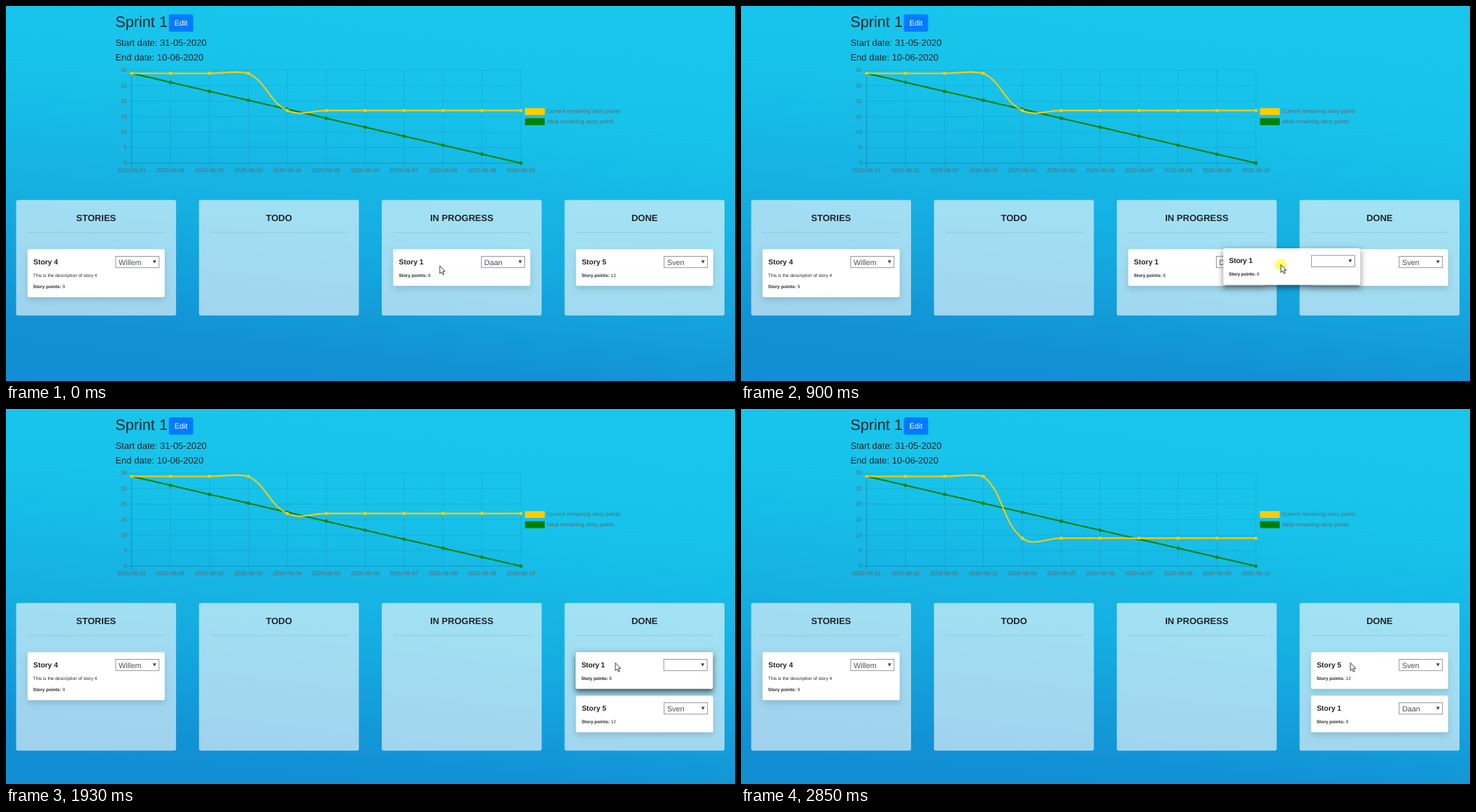
An HTML page with a canvas for the animation above (2930 ms loop, 1042 px wide and 537 px high).

```html
<!DOCTYPE html>
<html lang="en">
<head>
<meta charset="utf-8">
<title>Sprint board</title>
<style>
html, body { margin: 0; width: 100%; height: 100%; overflow: hidden; background: #15b4e4; }
canvas { display: block; width: 100vw; height: 100vh; }
</style>
</head>
<body>
<canvas id="board"></canvas>
<script>
const W = 1042, H = 537, LOOP = 2930;
const PRESS = 240, PICK = 330, ENTER = 1045, DROP = 1680, SWAP = 1950, CHART = 1960;
const FONT = '"Liberation Sans", Arial, sans-serif';
const INK = '#212529';
const COLS = ['STORIES', 'TODO', 'IN PROGRESS', 'DONE'];
const colX = i => 14.5 + i * 261.3;
const cardX = i => colX(i) + 16.3;
const CARD_W = 196, CARD_H = 52.5, ROW1 = 348.3, ROW2 = 410.5;

const story1 = { title: 'Story 1', owner: 'Daan', points: 8 };
const story4 = { title: 'Story 4', owner: 'Willem', points: 9, text: 'This is the description of story 4' };
const story5 = { title: 'Story 5', owner: 'Sven', points: 12 };

// [time, x, y]
const POINTER = [[210, 620, 372], [330, 623, 372.5], [450, 639.5, 374], [730, 715, 373],
  [900, 771.5, 370.5], [1170, 846.5, 360], [1260, 858, 360.5], [1440, 858, 360.5], [1530, 871, 363.5]];
const DRAG = [[330, 554, 348.5], [450, 568, 350], [730, 643, 349.5], [900, 689, 347],
  [1170, 775, 337], [1260, 791.5, 337], [1440, 791.5, 337], [1530, 805, 339.5]];

const canvas = document.getElementById('board');
const dpr = window.devicePixelRatio || 1;
canvas.width = W * dpr;
canvas.height = H * dpr;
const ctx = canvas.getContext('2d');
ctx.scale(dpr, dpr);
ctx.textRendering = 'geometricPrecision';

const lerp = (a, b, p) => a + (b - a) * p;
const clamp = (v, lo, hi) => Math.min(hi, Math.max(lo, v));

function follow(keys, t) {
  const i = keys.findIndex(k => k[0] > t);
  if (i === 0) return keys[0].slice(1);
  if (i < 0) return keys[keys.length - 1].slice(1);
  const a = keys[i - 1], b = keys[i], p = (t - a[0]) / (b[0] - a[0]);
  return [lerp(a[1], b[1], p), lerp(a[2], b[2], p)];
}

function text(str, x, y, size, { color = INK, weight = 400, align = 'left', spacing = 0 } = {}) {
  ctx.font = `${weight} ${size}px ${FONT}`;
  ctx.letterSpacing = spacing + 'px';
  ctx.textAlign = align;
  ctx.fillStyle = color;
  ctx.fillText(str, x, y);
  return ctx.measureText(str).width;
}

function box(x, y, w, h, r, color) {
  ctx.fillStyle = color;
  ctx.beginPath();
  ctx.roundRect(x, y, w, h, r);
  ctx.fill();
}

function line(x1, y1, x2, y2, color, width) {
  ctx.strokeStyle = color;
  ctx.lineWidth = width;
  ctx.beginPath();
  ctx.moveTo(x1, y1);
  ctx.lineTo(x2, y2);
  ctx.stroke();
}

// Casts only the shadow; the box itself stays off stage.
function shadow(x, y, w, h, dy, blur, spread, alpha) {
  const off = 3000;
  ctx.save();
  ctx.shadowColor = `rgba(0,0,0,${alpha})`;
  ctx.shadowBlur = blur * dpr;
  ctx.shadowOffsetX = off * dpr;
  ctx.shadowOffsetY = dy * dpr;
  box(x - off - spread, y - spread, w + 2 * spread, h + 2 * spread, 2, '#000');
  ctx.restore();
}

function background() {
  const g = ctx.createLinearGradient(521, 0, 521 - 62, H);
  g.addColorStop(0, '#18c5eb');
  g.addColorStop(0.24, '#17c3ea');
  g.addColorStop(0.6, '#15aee1');
  g.addColorStop(0.93, '#1291d5');
  g.addColorStop(1, '#128fd4');
  ctx.fillStyle = g;
  ctx.fillRect(0, 0, W, H);
}

function header() {
  text('Sprint 1', 156.2, 29.5, 21.7);
  box(232.7, 12, 34.8, 24.8, 2.6, '#007bff');
  text('Edit', 250.1, 27.7, 10.85, { color: '#fff', align: 'center' });
  text('Start date: 31-05-2020', 156.4, 57.4, 13.03);
  text('End date: 10-06-2020', 156.4, 78.4, 13.03);
}

const X0 = 179.5, DX = 55.65, Y_TOP = 92, Y_BASE = 225;
const dayX = i => X0 + i * DX;
const valueY = v => Y_BASE - v * (Y_BASE - Y_TOP) / 30;

// Spline with tension 0.4, handles kept inside the plot area.
function handles(pts, i) {
  const cur = pts[i], prev = pts[i - 1] || cur, next = pts[i + 1] || cur;
  const d1 = Math.hypot(cur[0] - prev[0], cur[1] - prev[1]);
  const d2 = Math.hypot(next[0] - cur[0], next[1] - cur[1]);
  const handle = d => {
    const f = 0.4 * d / (d1 + d2);
    return [clamp(cur[0] + f * (next[0] - prev[0]), X0, dayX(10)),
      clamp(cur[1] + f * (next[1] - prev[1]), Y_TOP, Y_BASE)];
  };
  return { before: handle(-d1), after: handle(d2) };
}

function series(values, color) {
  const pts = values.map((v, i) => [dayX(i), valueY(v)]);
  const ctl = pts.map((_, i) => handles(pts, i));
  ctx.strokeStyle = ctx.fillStyle = color;
  ctx.lineWidth = 2.05;
  ctx.beginPath();
  ctx.moveTo(...pts[0]);
  for (let i = 1; i < pts.length; i++)
    ctx.bezierCurveTo(...ctl[i - 1].after, ...ctl[i].before, ...pts[i]);
  ctx.stroke();
  for (const [x, y] of pts) {
    ctx.beginPath();
    ctx.arc(x, y, 2.4, 0, 7);
    ctx.fill();
  }
}

function chart(t) {
  const grey = '#666';
  const days = [...Array(11).keys()];
  for (const i of days) {
    const x = dayX(i);
    line(x, Y_TOP, x, Y_BASE + 6, `rgba(0,0,0,${i ? 0.1 : 0.25})`, 0.8);
    const label = i ? '2020-06-' + String(i).padStart(2, '0') : '2020-05-31';
    text(label, x, 238.4, 8, { color: grey, align: 'center' });
  }
  for (let v = 0; v <= 30; v += 5) {
    const y = valueY(v);
    line(X0 - 6, y, dayX(10), y, `rgba(0,0,0,${v ? 0.1 : 0.25})`, 0.8);
    text(v, 173, y + 2.4, 8, { color: grey, align: 'right' });
  }
  const p = clamp((t - CHART) / 1000, 0, 1);
  const left = lerp(17, 9, 1 - (1 - p) ** 4);
  series(days.map(i => 29 - 2.9 * i), '#008000');
  series(days.map(i => i < 4 ? 29 : left), '#ffcc00');

  box(741.7, 146.2, 28.3, 9.8, 0, '#ffcc00');
  text('Current remaining story points', 773, 153.3, 7.87, { color: grey });
  box(741.7, 160.6, 28.3, 10, 0, '#008000');
  text('Ideal remaining story points', 773, 167.8, 7.87, { color: grey });
}

function columns(height) {
  COLS.forEach((name, i) => {
    const x = colX(i);
    box(x, 277.8, 228.6, height, 2.7, 'rgba(255,255,255,.6)');
    text(name, x + 114.3, 308.2, 13.03, { weight: 700, align: 'center' });
    line(x + 16.3, 324.3, x + 212.3, 324.3, 'rgba(0,0,0,.12)', 0.8);
  });
}

function card(x, y, story, lifted = false) {
  const h = CARD_H + (story.text ? 16.2 : 0);
  if (lifted) {
    shadow(x, y, CARD_W, h, 3.4, 3.4, -2, 0.3);
    shadow(x, y, CARD_W, h, 5.4, 6.8, 0.7, 0.22);
    shadow(x, y, CARD_W, h, 2, 9.5, 1.4, 0.18);
  } else {
    shadow(x, y, CARD_W, h, 4.3, 8.7, 0, 0.13);
  }
  box(x, y, CARD_W, h, 2.2, '#fff');
  text(story.title, x + 8.2, y + 21.3, 10.4, { weight: 700, spacing: lifted ? -0.25 : 0 });

  const sx = x + 126, sy = y + 10.2;
  ctx.strokeStyle = '#8a8a8a';
  ctx.lineWidth = 0.9;
  ctx.strokeRect(sx, sy, 62, 16.2);
  if (!lifted) text(story.owner, sx + 4.2, sy + 12, 10.85, { color: '#495057' });
  ctx.fillStyle = '#444';
  ctx.beginPath();
  ctx.moveTo(sx + 53, sy + 5.8);
  ctx.lineTo(sx + 58, sy + 5.8);
  ctx.lineTo(sx + 55.5, sy + 10.2);
  ctx.fill();

  let base = y + 39.4;
  if (story.text) {
    text(story.text, x + 8, base, 6.51);
    base += 16.2;
  }
  const spacing = lifted ? -0.15 : 0;
  const w = text('Story points:', x + 8, base, 6.51, { weight: 700, spacing });
  text(story.points, x + 8 + w + 1.8, base, 6.51);
}

function pointer(x, y, pressed) {
  if (pressed) {
    ctx.fillStyle = 'rgba(255,255,0,.6)';
    ctx.beginPath();
    ctx.arc(x - 0.6, y, 8, 0, 7);
    ctx.fill();
  }
  const shape = [[0, 0], [0, 11.2], [2.5, 8.9], [4.3, 12.8], [6, 12], [4.3, 8.2], [7.6, 7.9]];
  ctx.beginPath();
  for (const [dx, dy] of shape) ctx.lineTo(x + dx, y + dy);
  ctx.closePath();
  ctx.fillStyle = '#fff';
  ctx.fill();
  ctx.strokeStyle = '#222';
  ctx.lineWidth = 0.9;
  ctx.stroke();
}

function draggedAt(t) {
  const [x, y] = follow(DRAG, t);
  const p = clamp((t - DROP) / 250, 0, 1);
  const e = 1 - (1 - p) ** 3;
  return [lerp(x, 814.2, e), lerp(y, ROW1, e)];
}

function draw(t) {
  const entered = t >= ENTER, swapped = t >= SWAP;
  background();
  header();
  chart(t);
  columns(entered ? 211.4 : 165.4);
  card(cardX(0), ROW1, story4);
  if (!entered) {
    card(cardX(2), ROW1, story1);
    card(cardX(3), ROW1, story5);
  } else {
    card(cardX(3), ROW1, swapped ? story5 : story1);
    card(cardX(3), ROW2, swapped ? story1 : story5);
  }
  if (t >= PICK && !swapped) card(...draggedAt(t), story1, true);
  pointer(...follow(POINTER, t), t >= PRESS && t < DROP);
}

const start = performance.now();
function frame() {
  draw((performance.now() - start) % LOOP);
  requestAnimationFrame(frame);
}
frame();
</script>
</body>
</html>
```
